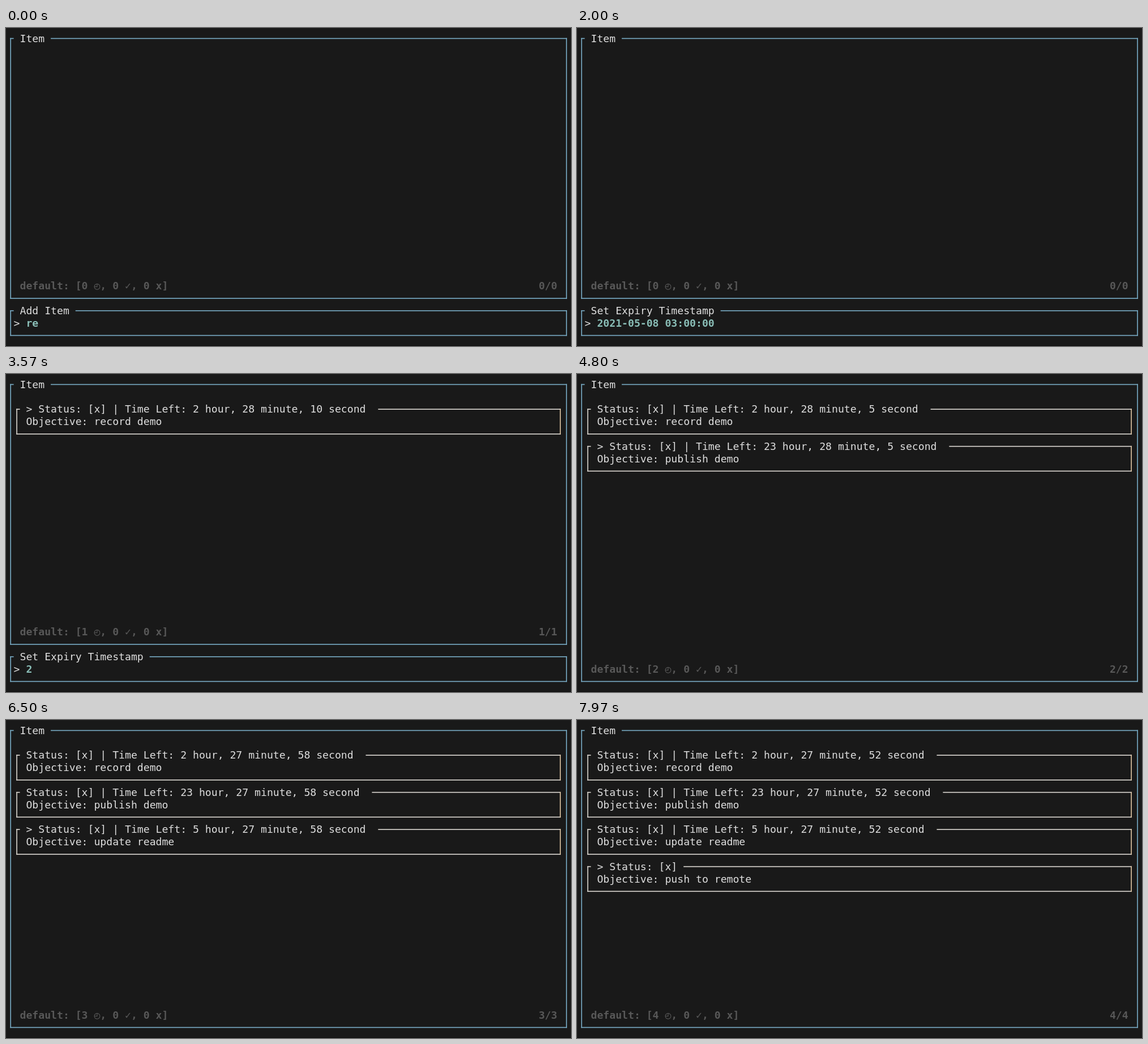
Write an HTML page with a canvas that moves like this. It is 998 by 561 pixels and loops after 8 s.

```html
<!DOCTYPE html>
<html lang="en">
<head>
<meta charset="utf-8">
<title>Terminal to-do list</title>
<style>
  html, body { margin: 0; width: 100%; height: 100%; overflow: hidden; background: #191919; }
  canvas { display: block; }
</style>
</head>
<body>
<canvas id="stage" width="998" height="561"></canvas>
<script>
const ctx = document.getElementById("stage").getContext("2d");
const LOOP = 8000;
const CELL_W = 10.91, CELL_H = 21.83, LEFT = 2.7, TOP_LINE = 18.5;
const LINE = 1.6;
const FONT = '18.12px "DejaVu Sans Mono", monospace';
const COLOR = {
  back: "#191919", text: "#dedede", dim: "#585858", input: "#8abeb7",
  outer: "#7aaec8", item: "#dedad4", itemRight: "#e2c9a6"
};

// Each entry is typed as a name, then as an expiry; times in ms.
const entries = [
  { open: -100, name: "record demo", nameAt: -60, nameStep: 50,
    ask: 680, expiry: "2021-05-08 03:00:00", expiryAt: 800, expiryStep: 50, done: 2130, hours: 2 },
  { open: 2480, name: "publish demo", nameAt: 2600, nameStep: 50,
    ask: 3340, expiry: "2021-05-09 00:00:00", expiryAt: 3545, expiryStep: 48, done: 4560, hours: 23 },
  { open: 5040, name: "update readme", nameAt: 5130, nameStep: 45,
    ask: 5790, expiry: "06:00:00", expiryAt: 5880, expiryStep: 45, done: 6400, hours: 5 },
  { open: 6850, name: "push to remote", nameAt: 6945, nameStep: 40,
    ask: 7560, expiry: "", expiryAt: 7560, expiryStep: 40, done: 7760 }
];

const colX = col => LEFT + col * CELL_W;
const midX = col => colX(col + 0.5);
const midY = row => TOP_LINE + row * CELL_H;

function write(text, col, row, color = COLOR.text, bold = false) {
  ctx.font = (bold ? "bold " : "") + FONT;
  ctx.fillStyle = color;
  [...text].forEach((char, i) => ctx.fillText(char, colX(col + i), midY(row) + 6.3));
}

function bar(x1, y1, x2, y2, color) {
  ctx.fillStyle = color;
  ctx.fillRect(x1 - LINE / 2, y1 - LINE / 2, x2 - x1 + LINE, y2 - y1 + LINE);
}

function box(title, col1, row1, col2, row2, color, rightColor = color) {
  const x1 = midX(col1), x2 = midX(col2), y1 = midY(row1), y2 = midY(row2);
  bar(x1, y1, colX(col1 + 1) - LINE / 2, y1, color);
  bar(colX(col1 + title.length + 3) + LINE / 2, y1, x2, y1, color);
  bar(x1, y2, x2, y2, color);
  bar(x1, y1, x1, y2, color);
  bar(x2, y1, x2, y2, rightColor);
  write(title, col1 + 2, row1);
}

function typed(text, start, step, t) {
  return text.slice(0, Math.max(0, Math.floor((t - start) / step) + 1));
}

// The recorded clock runs four times as fast as playback.
function timeLeft(hours, t) {
  const total = Math.floor(hours * 3600 + 28 * 60 + 10.5 - (t - 3570) / 250);
  const minutes = Math.floor(total / 60) % 60;
  return ` | Time Left: ${Math.floor(total / 3600)} hour, ${minutes} minute, ${total % 60} second `;
}

function drawItem(entry, index, selected, t) {
  const row = 2 + index * 3;
  const title = (selected ? "> " : "") + "Status: [x]" + (entry.hours ? timeLeft(entry.hours, t) : "");
  box(title, 1, row, 89, row + 2, COLOR.item, COLOR.itemRight);
  write("Objective: " + entry.name, 3, row + 1);
}

function drawPrompt(entry, t) {
  const asking = t >= entry.ask;
  box(asking ? "Set Expiry Timestamp" : "Add Item", 0, 22, 90, 24, COLOR.outer);
  write(">", 1, 23);
  const input = asking
    ? typed(entry.expiry, entry.expiryAt, entry.expiryStep, t)
    : typed(entry.name, entry.nameAt, entry.nameStep, t);
  write(input, 3, 23, COLOR.input, true);
}

function draw(t) {
  ctx.fillStyle = COLOR.back;
  ctx.fillRect(0, 0, 998, 561);
  ctx.fillStyle = "#0c0c0c";
  ctx.fillRect(0, 560, 998, 1);

  const items = entries.filter(entry => t >= entry.done);
  const active = entries.find(entry => t >= entry.open && t < entry.done);
  const count = items.length;
  const bottom = active ? 21 : 24;

  box("Item", 0, 0, 90, bottom, COLOR.outer);
  items.forEach((entry, i) => drawItem(entry, i, i === count - 1, t));
  write(`default: [${count} ◴, 0 ✓, 0 x]`, 2, bottom - 1, COLOR.dim, true);
  write(`${count}/${count}`, 86, bottom - 1, COLOR.dim, true);
  if (active) drawPrompt(active, t);
}

const start = performance.now();
function tick() {
  draw((performance.now() - start) % LOOP);
  requestAnimationFrame(tick);
}
tick();
</script>
</body>
</html>
```
